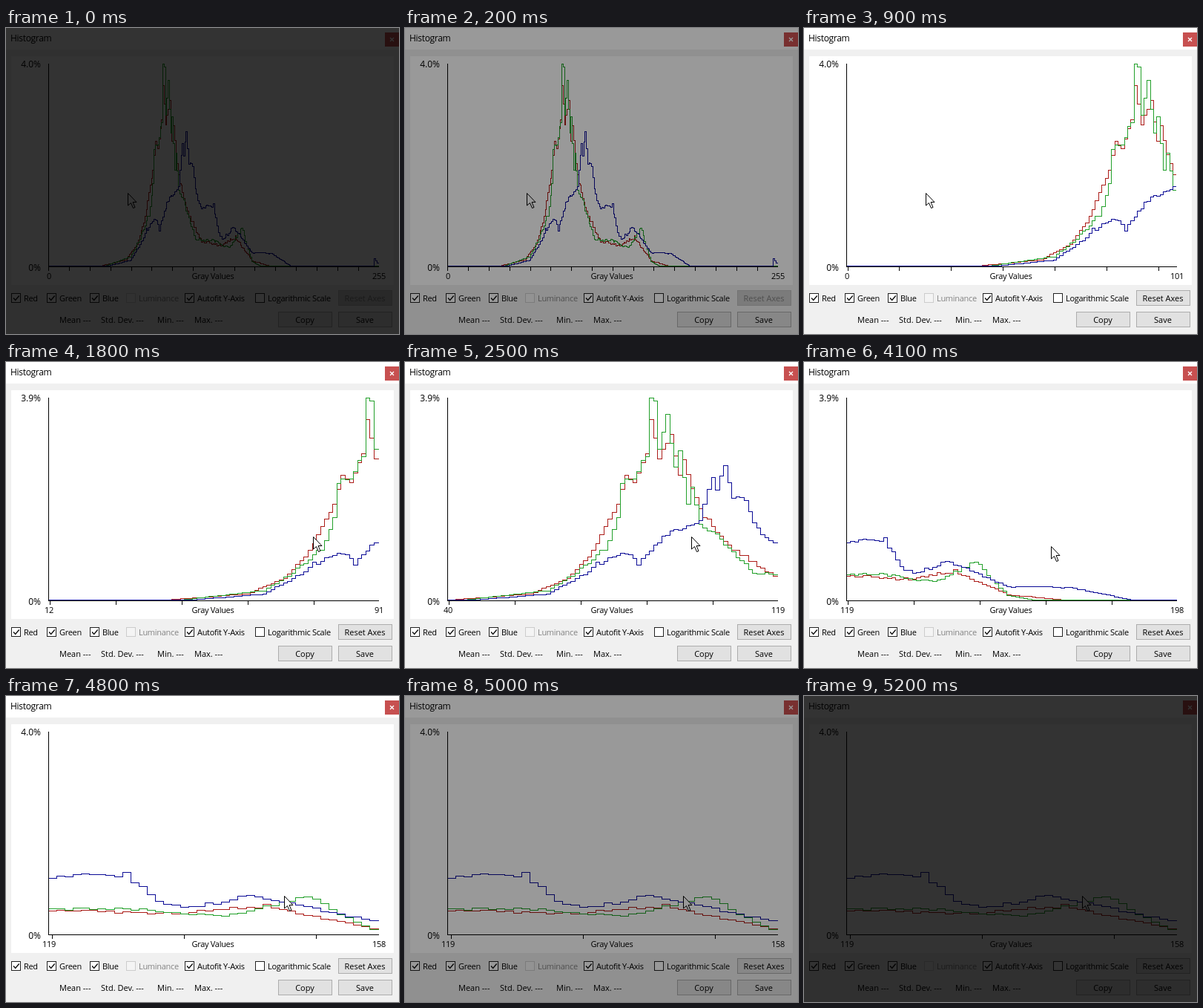
Recreate the animation shown at these times as an HTML page. Size 530 px wide and 412 px high, loop 5300 ms.

```html
<!DOCTYPE html>
<html lang="en">
<head>
<meta charset="utf-8">
<title>Histogram</title>
<style>
  html, body { margin: 0; width: 100%; height: 100%; overflow: hidden; background: #f0f0f0; }
  svg { display: block; width: 530px; height: 412px; }
  text { font: 11px "Open Sans", "Noto Sans", sans-serif; letter-spacing: -.3px; fill: #000; }
  .title { font-size: 12px; }
  .mid { text-anchor: middle; }
  .end { text-anchor: end; font-size: 12px; letter-spacing: 0; }
  .stat { letter-spacing: 0; }
  .btn text { letter-spacing: 0; text-anchor: middle; }
  .btn rect { fill: #e1e1e1; stroke: #adadad; }
  .off rect { fill: #ccc; stroke: #bfbfbf; }
  .off text { fill: #838383; }
  .box { fill: #fff; stroke: #222; }
  .off .box { fill: #f4f4f4; stroke: #ccc; }
  .check { fill: none; stroke: #111; stroke-width: 1.4; }
  .line { fill: none; shape-rendering: crispEdges; }
</style>
</head>
<body>
<svg viewBox="0 0 530 412">
  <rect width="530" height="412" fill="#f0f0f0"/>
  <rect width="530" height="29" fill="#fff"/>
  <text class="title" x="6" y="18">Histogram</text>
  <rect x="511" y="6" width="19" height="19" fill="#c75050"/>
  <path d="M518 13l5 5m0-5l-5 5" stroke="#fff" stroke-width="1.3"/>
  <rect x="7" y="38" width="516" height="308" fill="#fff"/>
  <g id="controls"></g>
  <text class="end" id="top" x="47" y="53"></text>
  <text class="end" x="47" y="327">0%</text>
  <text class="mid" id="first" x="58" y="338"></text>
  <text class="mid" x="279" y="338">Gray Values</text>
  <text class="mid" id="last" x="503" y="338"></text>
  <path class="line" id="axes" stroke="#000"/>
  <g id="curves"></g>
  <path id="cursor" d="M0 0V16.5L4 13L7 20L9.5 19L6.6 12H11.5Z" fill="#fff" stroke="#000"/>
  <rect id="shade" width="530" height="412"/>
</svg>
<script>
const LOOP = 5300, STEP = 100;
const LEFT = 57, WIDTH = 445, ZERO = 320.5, PEAK = 272;
const $ = id => document.getElementById(id);
const snap = v => Math.floor(v) + .5;

function add(parent, tag, attrs, text) {
  const el = document.createElementNS('http://www.w3.org/2000/svg', tag);
  for (const key in attrs) el.setAttribute(key, attrs[key]);
  if (text) el.textContent = text;
  return parent.appendChild(el);
}

function addCheck(x, label, on, off) {
  const g = add($('controls'), 'g', { class: off ? 'off' : '' });
  add(g, 'rect', { class: 'box', x: x + .5, y: 357.5, width: 12, height: 12 });
  if (on) add(g, 'path', { class: 'check', d: `M${x + 3} 363.5l2.7 3l5-6` });
  add(g, 'text', { x: x + 17, y: 368 }, label);
}

function addButton(x, y, label) {
  const g = add($('controls'), 'g', { class: 'btn' });
  add(g, 'rect', { x: x + .5, y: y + .5, width: 72, height: 20 });
  add(g, 'text', { x: x + 36, y: y + 15 }, label);
  return g;
}

addCheck(7, 'Red', true);
addCheck(55, 'Green', true);
addCheck(113, 'Blue', true);
addCheck(162, 'Luminance', false, true);
addCheck(241, 'Autofit Y-Axis', true);
addCheck(336, 'Logarithmic Scale', false);
const reset = addButton(448, 353, 'Reset Axes');
addButton(367, 382, 'Copy');
addButton(448, 382, 'Save');
[[72, 'Mean'], [128, 'Std. Dev.'], [204, 'Min.'], [254, 'Max.']].forEach(
  ([x, name]) => add($('controls'), 'text', { class: 'stat', x, y: 397 }, name + ' ---'));

// Keys are [position, value, ...]; values are linear in between.
function tween(keys, at) {
  let i = 0;
  while (i < keys.length - 2 && at > keys[i + 1][0]) i++;
  const [a, b] = [keys[i], keys[i + 1]];
  const p = Math.min(1, Math.max(0, (at - a[0]) / (b[0] - a[0])));
  return a.slice(1).map((v, k) => v + (b[k + 1] - v) * p);
}

function seeded(seed) {
  return () => (seed = (seed * 16807) % 2147483647) / 2147483647;
}

// Each channel is an outline through its main turns, plus slight noise.
function addChannel(color, seed, keys) {
  const random = seeded(seed);
  const bars = Array.from({ length: 256 }, (_, bin) => {
    const h = tween(keys, bin)[0];
    return h + (random() * 2 - 1) * Math.min(3, h * .06);
  });
  return { bars, path: add($('curves'), 'path', { class: 'line', stroke: color }) };
}

const channels = [
  addChannel('#ac1c18', 4127, [
    [40, 0], [60, 8], [69, 30], [75, 66], [81, 130], [83, 170], [85, 161], [88, 196], [89, 246],
    [91, 193], [94, 224], [96, 168], [97, 187], [99, 152], [102, 113], [108, 73], [119, 33],
    [134, 28], [145, 39], [158, 7], [172, 0]]),
  addChannel('#22a02a', 9203, [
    [44, 0], [64, 13], [72, 41], [78, 69], [81, 110], [82, 161], [85, 163], [88, 197], [89, 273],
    [90, 272], [91, 206], [93, 250], [95, 179], [96, 203], [98, 129], [99, 150], [101, 104],
    [106, 82], [114, 36], [128, 34], [140, 24], [150, 51], [158, 6], [164, 0]]),
  addChannel('#0a0a96', 6611, [
    [46, 0], [64, 8], [73, 35], [76, 49], [83, 63], [86, 49], [92, 86], [101, 108], [104, 167],
    [105, 150], [107, 182], [109, 138], [112, 135], [114, 102], [118, 78], [128, 82], [132, 43],
    [136, 36], [143, 53], [158, 18], [173, 17], [188, 0], [252, 0], [253, 10], [255, 4]])
];
const tallest = Math.max(...channels.flatMap(c => c.bars));

const zoomKeys = [[400, 256], [900, 102], [1000, 80], [4200, 80], [4500, 40]]
  .map(([t, count]) => [t, Math.log2(count)]);
const panKeys = [[1500, 0], [2500, 40], [3500, 74], [4000, 119]];
const cursorKeys = [[1000, 164, 222], [1500, 426, 235], [2500, 386, 235], [3500, 357, 237],
  [4000, 312, 238], [4300, 375, 269]];

function draw(time) {
  const t = Math.floor(time % LOOP / STEP) * STEP;
  const count = Math.round(2 ** tween(zoomKeys, t)[0]);
  const start = Math.round(tween(panKeys, t)[0]);
  const barW = WIDTH / count;
  const scale = PEAK / tallest * (count < 80 ? .985 : 1);

  for (const { bars, path } of channels) {
    let d = '';
    for (let i = 0; i < count; i++) {
      const y = ZERO - Math.round(bars[start + i] * scale);
      d += `${i ? 'V' : 'M57.5 '}${y}H${snap(LEFT + (i + 1) * barW)}`;
    }
    path.setAttribute('d', d);
  }

  let axes = 'M57.5 48V322M57 321.5H503';
  for (let i = 0; i < count; i += 16) axes += `M${snap(LEFT + (i + .5) * barW)} 322V327`;
  $('axes').setAttribute('d', axes);

  $('top').textContent = count === 80 ? '3.9%' : '4.0%';
  $('first').textContent = start;
  $('last').textContent = start + count - 1;
  reset.setAttribute('class', count === 256 ? 'btn off' : 'btn');

  const [x, y] = tween(cursorKeys, t).map(snap);
  $('cursor').setAttribute('transform', `translate(${x} ${y})`);
  $('shade').setAttribute('opacity', Math.max(0, .8 - t / 500, (t - 4800) / 500));
}

const begin = performance.now();
function tick() {
  draw(performance.now() - begin);
  requestAnimationFrame(tick);
}
tick();
</script>
</body>
</html>
```
